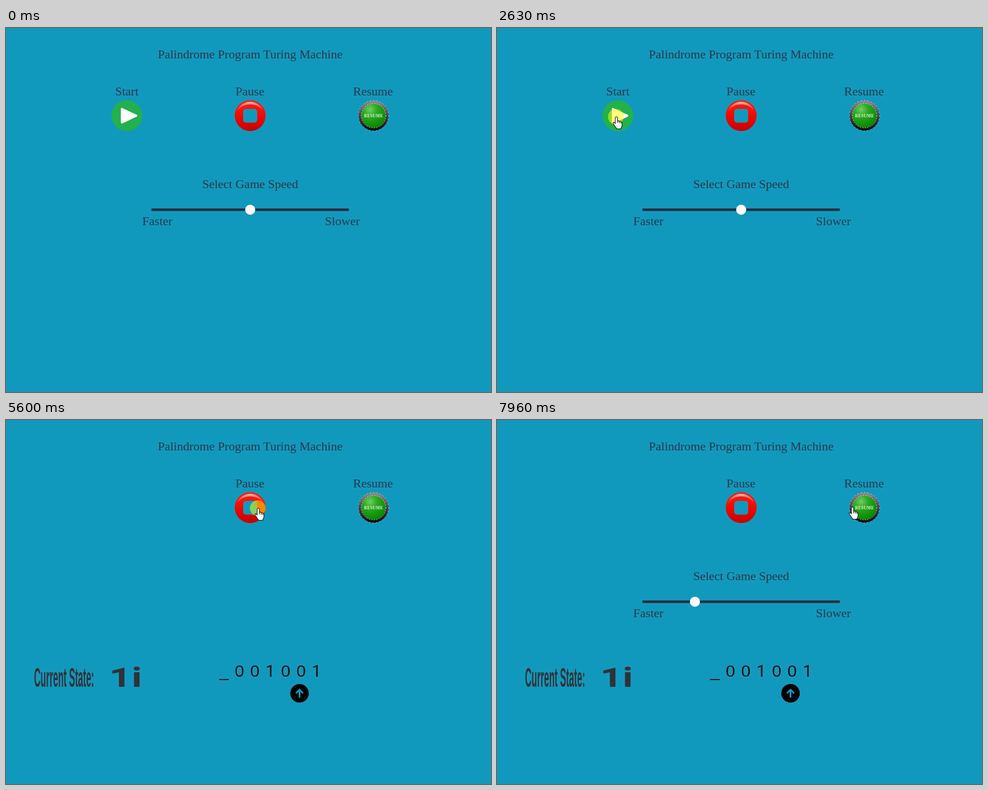
Recreate the animation shown at these times as an HTML page. Size 865 px wide and 648 px high, loop 8000 ms.

```html
<!DOCTYPE html>
<html lang="en">
<head>
<meta charset="utf-8">
<title>Palindrome Program Turing Machine</title>
<style>
  html, body { margin: 0; width: 100%; height: 100%; overflow: hidden; background: #1199bd; }
  svg { display: block; }
  .label { font: 22px "Liberation Serif", "Times New Roman", serif; fill: #27384a; text-anchor: middle; }
  .tape { font: 30px "Liberation Sans", Arial, sans-serif; fill: #111; text-anchor: middle; }
  .state { font: bold 48px "Liberation Sans", Arial, sans-serif; fill: #303236; }
  .plain-one { font-family: Roboto, sans-serif; }
  .cursor path { fill: #fff; stroke: #111; stroke-width: 1.1; stroke-linejoin: round; }
</style>
</head>
<body>
<svg width="865" height="648" viewBox="0 0 865 648">
  <defs>
    <linearGradient id="red" x2="0" y2="1">
      <stop offset="0" stop-color="#e8291c"/><stop offset=".35" stop-color="#ff0c00"/><stop offset="1" stop-color="#c60000"/>
    </linearGradient>
    <linearGradient id="shine" x2="0" y2="1">
      <stop offset="0" stop-color="#ffb5a8"/><stop offset="1" stop-color="#ff4a3a" stop-opacity=".2"/>
    </linearGradient>
    <linearGradient id="rim" x2="0" y2="1">
      <stop offset="0" stop-color="#8d8d8d"/><stop offset=".5" stop-color="#45444a"/><stop offset="1" stop-color="#0b0b0b"/>
    </linearGradient>
    <radialGradient id="green" cx=".36" cy=".25" r=".75">
      <stop offset="0" stop-color="#6fce62"/><stop offset=".4" stop-color="#2aa820"/><stop offset="1" stop-color="#078a00"/>
    </radialGradient>
  </defs>

  <text class="label" x="435.5" y="54">Palindrome Program Turing Machine</text>

  <g id="start">
    <text class="label" x="215.5" y="120">Start</text>
    <circle cx="215.5" cy="156" r="27.5" fill="#22b14c"/>
    <path d="M206.5 144V168.5L232.5 156.2Z" fill="#fff" stroke="#fff" stroke-width="3.5" stroke-linejoin="round"/>
  </g>

  <text class="label" x="435" y="120">Pause</text>
  <circle cx="435.5" cy="156" r="27.5" fill="url(#red)"/>
  <path d="M411 150A25.5 25.5 0 0 1 460 150A27 24 0 0 0 411 150Z" fill="url(#shine)"/>
  <rect x="423" y="144" width="25" height="24.5" rx="5" fill="#1199bd"/>

  <text class="label" x="654.5" y="120">Resume</text>
  <g transform="translate(655.5 156)">
    <circle r="27" fill="url(#rim)"/>
    <circle r="27" fill="none" stroke="#dfe9ec" stroke-width=".7" stroke-dasharray="2 4"/>
    <circle r="21.5" fill="url(#green)"/>
    <circle r="21.8" fill="none" stroke="#e6f3e2" stroke-width=".9" stroke-dasharray="2 2.5"/>
    <text y="3" text-anchor="middle" font-family="Liberation Serif, serif" font-weight="bold" font-size="7.5" letter-spacing=".3" fill="#e4f6df">RESUME</text>
  </g>

  <g id="speed">
    <text class="label" x="435.5" y="285">Select Game Speed</text>
    <rect x="259.5" y="321.3" width="352" height="4.4" fill="#282b3d"/>
    <circle id="knob" cx="435.5" cy="323.5" r="9" fill="#fff"/>
    <text class="label" x="270" y="351">Faster</text>
    <text class="label" x="600" y="351">Slower</text>
  </g>

  <g id="machine">
    <text class="state" transform="translate(50 474.5) scale(.335 1)">Current State:</text>
    <text class="state" id="state0" transform="translate(183 474.5) scale(2.1 1)">0</text>
    <text class="state plain-one" id="state1" transform="translate(184 474.5) scale(1.45 1)">1i</text>
    <g id="tape"></g>
    <g id="head">
      <circle cy="486.5" r="16.5"/>
      <path d="M-6.3 486.5L0 480.2L6.3 486.5M0 481V494" fill="none" stroke="#1199bd" stroke-width="3"/>
    </g>
  </g>

  <g id="pointer" class="cursor">
    <circle id="press" cx="-1" r="14" fill="#ff0" fill-opacity=".52"/>
    <path id="arrow" d="M.5 1V16L3.800 13L6.200 18.500L8.400 17.500L6.100 12.200H10.500Z"/>
    <g id="hand">
      <path d="M-2 1.500Q-1.900 0 0 0T2 1.500V7.500Q4.500 6.300 5.100 8.300Q7.300 7.300 7.900 9.300Q10 8.900 10 11V15.500Q9.800 18 8.200 19.500V21.500H-.2V20Q-2.500 18 -3.500 15.500L-5.800 12.200Q-6.400 9.900 -4.200 9.900L-2 12Z"/>
      <path d="M2 7.500V11M5.100 8.500V11.500M7.900 9.500V12" stroke-width=".9"/>
    </g>
  </g>
</svg>
<script>
const LOOP = 8000, CLICK = 70;
const START = 2630, PAUSE = 5600, RUN = START + CLICK, PAUSED = PAUSE + CLICK;
const FIRST_TICK = 3230, TICK = 505, TICKS = 5, CELL = 27.5;

const linear = u => u;
const smooth = u => u * u * (3 - 2 * u);
const easeOut = power => u => 1 - (1 - u) ** power;

const drag = { start: 6440, end: 7200, steps: 11, ease: linear, path: [[435, 327], [394, 326], [353, 326]] };

// Each path is a quadratic curve: from, control point, to.
const moves = [
  { start: 130, end: 620, steps: 7, ease: easeOut(1.3), path: [[780, 638], [560, 494], [341, 352]] },
  { start: 830, end: 1290, steps: 7, ease: linear, path: [[334, 345], [120, 110], [213, 158]] },
  { start: 3760, end: 4460, steps: 10, ease: easeOut(2), path: [[216, 159], [331, 140], [446, 146]] },
  { start: 5260, end: 5400, steps: 2, ease: linear, path: [[447, 152], [449, 154], [450, 157]] },
  { start: PAUSE, end: 6370, steps: 11, ease: smooth, path: [[450, 157], [425, 385], [435, 327]] },
  drag,
  { start: 7270, end: 7960, steps: 10, ease: smooth, path: [[356, 325], [500, 238], [634, 155]] }
];

const $ = id => document.getElementById(id);
const show = (id, on) => $(id).setAttribute("display", on ? "inline" : "none");
const place = (id, x, y) => $(id).setAttribute("transform", `translate(${x} ${y})`);
const clamp = (v, max) => Math.max(0, Math.min(max, v));
const within = (t, from, to) => t >= from && t < to;

function setCell(cell, text) {
  cell.textContent = text;
  cell.setAttribute("class", text === "1" ? "tape plain-one" : "tape");
}

const cells = [..."1001001"].map((digit, i) => {
  const cell = document.createElementNS("http://www.w3.org/2000/svg", "text");
  cell.setAttribute("x", 388.8 + CELL * i);
  cell.setAttribute("y", 457.2);
  setCell(cell, digit);
  $("tape").append(cell);
  return cell;
});

// Motion advances in whole steps; the slack absorbs rounded step times.
const stepOf = (t, { start, end, steps }) =>
  clamp(Math.floor((t - start) / (end - start) * steps + 0.2), steps);

function pointerAt(t) {
  const move = moves.findLast(m => t >= m.start);
  if (!move) return null;
  const u = move.ease(stepOf(t, move) / move.steps);
  const [a, b, c] = move.path;
  return a.map((v, k) => v * (1 - u) ** 2 + 2 * b[k] * u * (1 - u) + c[k] * u * u);
}

function drawMachine(t) {
  const moved = clamp(Math.floor((t - FIRST_TICK) / TICK) + 1, TICKS);
  show("state0", !moved);
  show("state1", moved);
  setCell(cells[0], moved ? "_" : "1");
  place("head", 386 + CELL * moved, 0);
}

function drawKnob(t) {
  // While dragged, the knob trails the pointer by one step.
  const step = stepOf(t, drag);
  const shown = step === drag.steps ? step : Math.max(0, step - 1);
  $("knob").setAttribute("cx", 435.5 - 82.5 * shown / drag.steps);
}

function drawPointer(t, running, speed) {
  const tip = pointerAt(t);
  show("pointer", tip);
  if (!tip) return;
  const [x, y] = tip;
  place("pointer", x, y);
  const buttons = running ? [435.5, 655.5] : [215.5, 435.5, 655.5];
  const overButton = buttons.some(cx => Math.hypot(x - cx, y - 156) < 28);
  const overKnob = speed && Math.hypot(x - $("knob").getAttribute("cx"), y - 323.5) < 10;
  const hand = overButton || overKnob;
  show("hand", hand);
  show("arrow", !hand);
  show("press", within(t, START, RUN) || within(t, PAUSE, PAUSED) || within(t, drag.start, drag.end));
}

function draw(t) {
  const running = t >= RUN, speed = !running || t >= PAUSED;
  show("start", !running);
  show("speed", speed);
  show("machine", running);
  drawMachine(t);
  drawKnob(t);
  drawPointer(t, running, speed);
}

function frame() {
  draw(performance.now() % LOOP);
  requestAnimationFrame(frame);
}
frame();
</script>
</body>
</html>
```
